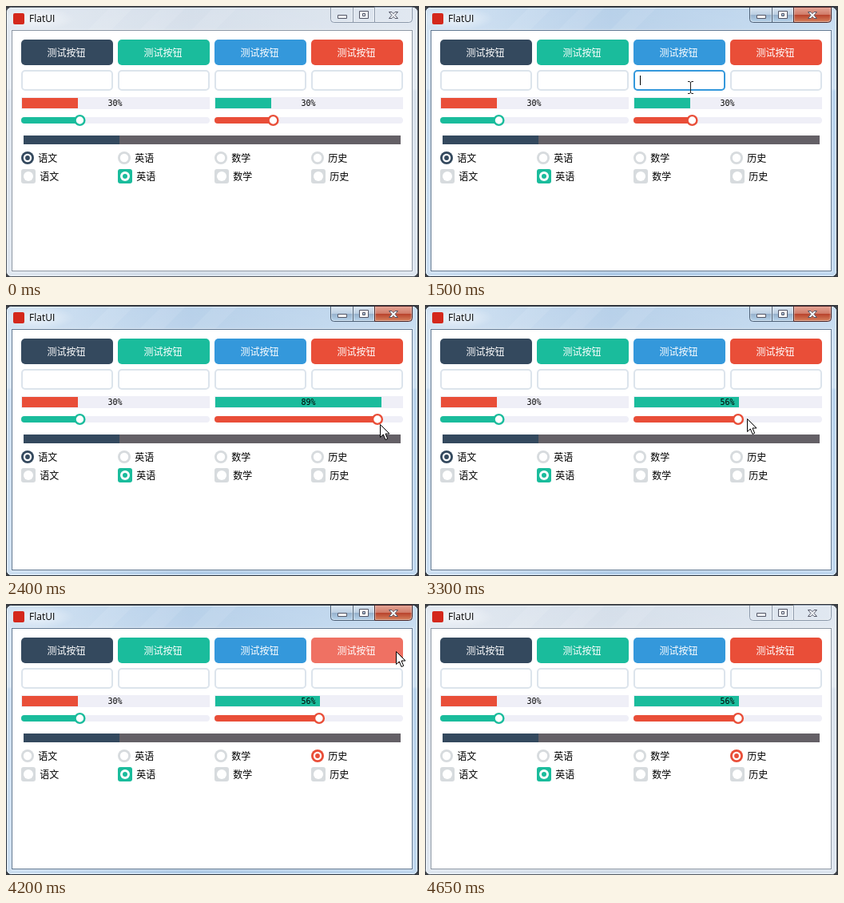
These frames come from a looping animation (517x339 px, 4.8 s). An HTML page:

```html
<!DOCTYPE html>
<html lang="zh-CN">
<head>
<meta charset="utf-8">
<title>FlatUI</title>
<style>
  html, body { margin: 0; width: 100%; height: 100%; overflow: hidden; background: #3a3d42; }
  svg { display: block; width: 517px; height: 339px; }
  text { font: 12px "Noto Sans CJK SC", "Noto Sans CJK", sans-serif; }
  .title { font-family: "Open Sans", "Noto Sans", sans-serif; }
  .percent { font: 10px "DejaVu Sans Mono", "Noto Sans Mono", monospace; }
</style>
</head>
<body>
<svg id="stage" viewBox="0 0 517 339" xmlns="http://www.w3.org/2000/svg">
  <defs>
    <linearGradient id="glassOn">
      <stop offset="0" stop-color="#c8dcf0"/>
      <stop offset=".45" stop-color="#a6c5e4"/>
      <stop offset="1" stop-color="#bad4ed"/>
    </linearGradient>
    <linearGradient id="glassOff">
      <stop offset="0" stop-color="#dce4ee"/>
      <stop offset=".45" stop-color="#cbd7e5"/>
      <stop offset="1" stop-color="#d9e2ed"/>
    </linearGradient>
    <linearGradient id="shine" x2="0" y2="1">
      <stop offset="0" stop-color="#fff" stop-opacity=".2"/>
      <stop offset=".3" stop-color="#fff" stop-opacity=".3"/>
      <stop offset=".31" stop-color="#fff" stop-opacity="0"/>
      <stop offset="1" stop-color="#fff" stop-opacity=".1"/>
    </linearGradient>
    <linearGradient id="capOn" x2="0" y2="1">
      <stop offset="0" stop-color="#dbe7f3"/><stop offset=".48" stop-color="#bccfe2"/>
      <stop offset=".5" stop-color="#95b0cb"/><stop offset="1" stop-color="#b6d2ea"/>
    </linearGradient>
    <linearGradient id="closeOn" x2="0" y2="1">
      <stop offset="0" stop-color="#e5a596"/><stop offset=".48" stop-color="#d07b68"/>
      <stop offset=".5" stop-color="#b8412b"/><stop offset="1" stop-color="#d5805c"/>
    </linearGradient>
    <radialGradient id="glow">
      <stop offset="0" stop-color="#fff" stop-opacity=".6"/><stop offset="1" stop-color="#fff" stop-opacity="0"/>
    </radialGradient>
  </defs>
</svg>
<script>
const stage = document.getElementById('stage');
const colors = ['#34495e', '#1abc9c', '#3498db', '#e94e38'];
const hoverColors = ['#4e6d8c', '#2ee1c1', '#5dace4', '#ef7163'];
const idle = '#d7dbde', track = '#efeff7';
const colStep = 121, left = 19, boxWidth = 115;

function set(el, attrs) {
  for (const key in attrs) el.setAttribute(key, attrs[key]);
}
function add(tag, attrs, parent = stage) {
  const el = document.createElementNS('http://www.w3.org/2000/svg', tag);
  set(el, attrs);
  parent.append(el);
  return el;
}
function rect(x, y, width, height, fill, rx = 0, parent) {
  return add('rect', { x, y, width, height, fill, rx }, parent);
}
function outline(inset, stroke, opacity, rx, parent) {
  add('rect', {
    x: inset, y: inset + 1, width: 516 - 2 * inset, height: 338 - 2 * inset,
    rx, fill: 'none', stroke, 'stroke-opacity': opacity
  }, parent);
}
function circle(cx, cy, r, fill) {
  return add('circle', { cx, cy, r, fill });
}
function path(d, attrs, parent) {
  return add('path', { d, fill: 'none', ...attrs }, parent);
}
function label(x, y, str, attrs = {}) {
  const el = add('text', { x, y, fill: '#000', ...attrs });
  el.textContent = str;
  return el;
}
const show = (el, on) => el.style.display = on ? '' : 'none';

// Window frame in its active and inactive looks
function frame(active) {
  const g = add('g', {});
  rect(.5, 1.5, 515, 337, `url(#${active ? 'glassOn' : 'glassOff'})`, 6, g);
  for (let x = 130; x < 300; x += 65)
    path(`M${x} 2h30l-28 28h-30z`, { fill: '#fff', opacity: .08 }, g);
  rect(2, 3, 512, 334, 'url(#shine)', 5, g);
  add('ellipse', { cx: 40, cy: 16, rx: 46, ry: 14, fill: 'url(#glow)' }, g);
  outline(.5, active ? '#27313d' : '#50565e', 1, 6, g);
  outline(1.5, '#f3f8fd', .75, 5, g);
  add('rect', { x: 6.5, y: 29.5, width: 503, height: 303, fill: 'none', stroke: '#fff', 'stroke-opacity': .45 }, g);
  add('rect', { x: 7.5, y: 30.5, width: 501, height: 301, fill: '#fff', stroke: active ? '#5d7590' : '#8994a2' }, g);

  if (active) {
    path('M406 2H461V20H410Q406 20 406 16Z', { fill: 'url(#capOn)' }, g);
    path('M461 2H508V16Q508 20 504 20H461Z', { fill: 'url(#closeOn)' }, g);
  }
  const edge = active ? '#4d6076' : '#8b98a9';
  const closeBox = 'M461.5 1.5H508.5V16.5Q508.5 20.5 504.5 20.5H461.5Z';
  path('M406.5 2V16.5Q406.5 20.5 410.5 20.5H461.5M434.5 2V20', { stroke: edge }, g);
  path('M407.5 2V16Q407.5 19.5 411 19.5H433.5V2M435.5 2V19.5H460.5V2M462.5 2V19.5H504Q507.5 19.5 507.5 16V2',
    { stroke: '#fff', 'stroke-opacity': .4 }, g);
  path(closeBox, { stroke: active ? '#4a2426' : edge }, g);

  const ink = { stroke: '#535666', fill: active ? '#fff' : '#f1f4f8' };
  path('M415.5 11.5H426.5V15.5H415.5Z', ink, g);
  path('M442.5 6.5H453.5V15.5H442.5ZM446.5 9.5V12.5H449.5V9.5Z', { ...ink, 'fill-rule': 'evenodd' }, g);
  path('M479.5 7.5H483L485 9.7L487 7.5H490.5L487 11.5L490.5 15.5H487L485 13.3L483 15.5H479.5L483 11.5Z', ink, g);
  return g;
}
const offFrame = frame(false), onFrame = frame(true);

rect(9, 9, 14, 14, '#d4281c', 2);
label(29, 20, 'FlatUI', { class: 'title' });

const buttons = [], inputs = [], radios = [];
['语文', '英语', '数学', '历史'].forEach((name, i) => {
  const x = left + colStep * i;
  buttons.push(rect(x, 42, boxWidth, 32, colors[i], 5));
  label(x + 56.5, 63, '测试按钮', { fill: '#fff', 'text-anchor': 'middle' });
  inputs.push(add('rect', { x: x + 1, y: 81, width: boxWidth - 2, height: 24, rx: 4, fill: '#fff', 'stroke-width': 2 }));

  const ring = circle(x + 8, 190, 8, idle);
  circle(x + 8, 190, 5.2, '#fff');
  radios.push({ ring, dot: circle(x + 8, 190, 2.9, colors[i]) });
  label(x + 21.3, 194.5, name);

  const checked = i === 1;
  rect(x, 204, 18, 18, checked ? colors[1] : idle, 3);
  circle(x + 9, 213, 6, '#fff');
  if (checked) circle(x + 9, 213, 3, colors[1]);
  label(x + 23.3, 217.5, name);
});
const caret = rect(0, 87, 1, 12, '#000');

// A progress bar with its slider below; returns a setter for the value
const knobStart = 7.1, knobScale = 2.212;
function gauge(x, barColor, slideColor) {
  rect(x, 114, 236, 15, track);
  const bar = rect(x + 1, 115, 0, 13, barColor);
  const text = label(x + 117.5, 125, '', { class: 'percent', 'text-anchor': 'middle' });
  rect(x, 139, 236, 8, track, 4);
  const fill = rect(x, 139, 0, 8, slideColor, 4);
  const knob = add('circle', { cy: 143, r: 5.9, fill: '#fff', stroke: slideColor, 'stroke-width': 2.4 });
  return value => {
    const pos = knobStart + knobScale * value;
    set(bar, { width: Math.round(2.34 * value) });
    set(fill, { width: pos });
    set(knob, { cx: x + pos });
    text.textContent = value + '%';
  };
}
const rightX = left + 2 * colStep;
gauge(left, colors[3], colors[1])(30);
const setRight = gauge(rightX, colors[1], colors[3]);

rect(22, 162, 472, 11, '#646066');
rect(22, 162, 120, 11, colors[0]);

const arrow = path('M.5 .5V16.5L4.3 13L7 19.5L9.7 18.3L7 12H12Z', { fill: '#fff', stroke: '#000' });
const beam = path('M-3 -7.5H-1L.5 -6.5L2 -7.5H4M.5 -6.5V6.5M-3 7.5H-1L.5 6.5L2 7.5H4', { stroke: '#222' });

// The pointer's stops: time, x, y
const stops = [
  [150, 101, 75], [600, 83, 101], [1500, 332, 102], [1800, 434, 99],
  [2100, 337.4, 143], [2400, 468, 149], [2700, 395, 143], [3150, 395, 143],
  [3300, 403, 142], [3750, 392, 189], [4200, 488, 59], [4350, 503, 24]
];
const press = 2100, release = 2700, pick = 3750;
const clamp = (v, lo, hi) => Math.min(hi, Math.max(lo, v));

function pointerAt(time) {
  const t = clamp(time, stops[0][0], stops.at(-1)[0]);
  const n = Math.max(1, stops.findIndex(s => s[0] >= t));
  const [t0, x0, y0] = stops[n - 1], [t1, x1, y1] = stops[n];
  const k = (t - t0) / (t1 - t0);
  return { x: x0 + (x1 - x0) * k, y: y0 + (y1 - y0) * k };
}
// Column of the box in the given row under the pointer, or -1
function columnAt({ x, y }, top, bottom) {
  const inside = y >= top && y < bottom && (x - left) % colStep < boxWidth;
  return inside ? Math.floor((x - left) / colStep) : -1;
}

function draw(t) {
  const active = t >= stops[0][0] && t <= stops.at(-1)[0];
  const p = pointerAt(t);
  const overInput = columnAt(p, 80, 106), overButton = columnAt(p, 42, 74);
  const focus = t >= 450 && t < press ? overInput : -1;
  const radio = t < pick ? 0 : 3;
  const grip = pointerAt(clamp(t, press, release)).x - 3;

  show(onFrame, active);
  show(offFrame, !active);
  buttons.forEach((el, i) => set(el, { fill: (active && i === overButton ? hoverColors : colors)[i] }));
  inputs.forEach((el, i) => set(el, { stroke: i === focus ? colors[i] : '#dce4ec' }));
  show(caret, focus >= 0);
  set(caret, { x: left + 8 + colStep * focus });
  setRight(Math.round((grip - rightX - knobStart) / knobScale));
  radios.forEach(({ ring, dot }, i) => {
    set(ring, { fill: i === radio ? colors[i] : idle });
    show(dot, i === radio);
  });
  show(arrow, active && overInput < 0);
  show(beam, active && overInput >= 0);
  for (const el of [arrow, beam])
    set(el, { transform: `translate(${Math.round(p.x)} ${Math.round(p.y)})` });
}

// The picture advances in steps of 150 ms
const loop = 4800, beat = 150;
let last;
function tick() {
  const t = Math.floor(performance.now() % loop / beat) * beat;
  if (t !== last) draw(last = t);
  requestAnimationFrame(tick);
}
tick();
</script>
</body>
</html>
```
